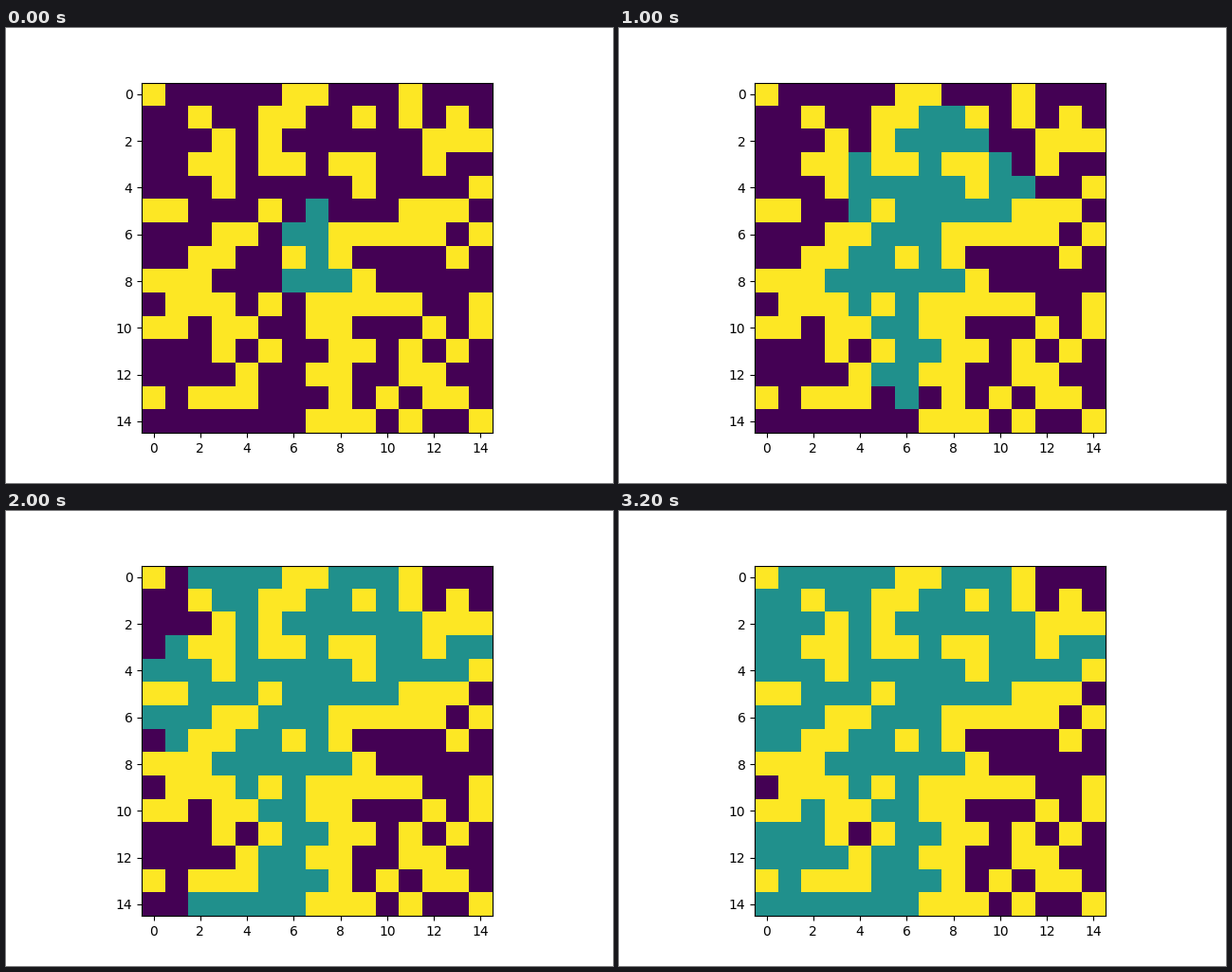
These frames come from a looping animation (640 by 480 pixels, 8000 ms). A matplotlib script:

```python
import numpy as np
import matplotlib.pyplot as plt
from matplotlib.animation import FuncAnimation

SIZE = 15
START = (7, 7)
FIRST_STEP = 2
FRAMES = 40
INTERVAL = 200
OPEN, FILLED, WALL = 0, 1, 2

# Wall columns, row by row
WALLS = [
    (0, 6, 7, 11),
    (2, 5, 6, 9, 11, 13),
    (3, 5, 12, 13, 14),
    (2, 3, 5, 6, 8, 9, 12),
    (3, 9, 14),
    (0, 1, 5, 11, 12, 13),
    (3, 4, 8, 9, 10, 11, 12, 14),
    (2, 3, 6, 8, 13),
    (0, 1, 2, 9),
    (1, 2, 3, 5, 7, 8, 9, 10, 11, 14),
    (0, 1, 3, 4, 7, 8, 12, 14),
    (3, 5, 8, 9, 11, 13),
    (4, 7, 8, 11, 12),
    (0, 2, 3, 4, 8, 10, 12, 13),
    (7, 8, 9, 11, 14),
]


def build_maze():
    maze = np.full((SIZE, SIZE), OPEN)
    for row, cols in enumerate(WALLS):
        maze[row, list(cols)] = WALL
    return maze


def distances(maze, start):
    """Breadth-first distance of every reachable cell from start."""
    dist = np.full(maze.shape, np.inf)
    dist[start] = 0
    queue = [start]
    for r, c in queue:
        for cell in ((r - 1, c), (r + 1, c), (r, c - 1), (r, c + 1)):
            inside = 0 <= cell[0] < SIZE and 0 <= cell[1] < SIZE
            if inside and maze[cell] == OPEN and np.isinf(dist[cell]):
                dist[cell] = dist[r, c] + 1
                queue.append(cell)
    return dist


maze = build_maze()
dist = distances(maze, START)


def flooded(frame):
    return np.where(dist <= frame + FIRST_STEP, FILLED, maze)


fig, ax = plt.subplots(figsize=(6.4, 4.8), dpi=100)
image = ax.imshow(flooded(0), cmap="viridis", vmin=OPEN, vmax=WALL)


def update(frame):
    image.set_data(flooded(frame))
    return [image]


anim = FuncAnimation(fig, update, frames=FRAMES, interval=INTERVAL,
                     repeat=True, repeat_delay=0)
plt.show()
```
